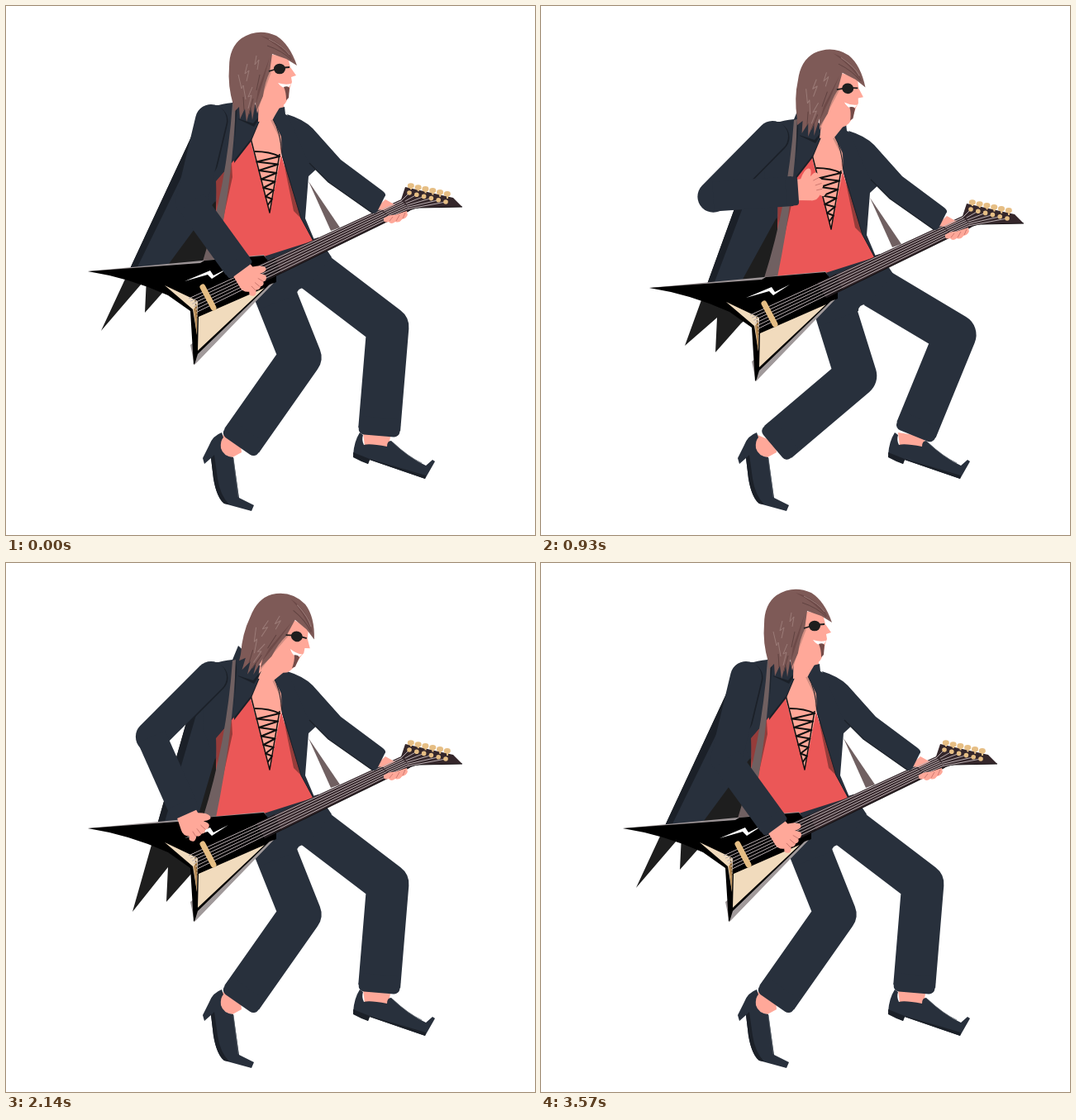
Recreate the animation shown at these times as an HTML page with a canvas. Size 640x640 px, loop 3.64 s.

```html
<!DOCTYPE html>
<html lang="en">
<head>
<meta charset="utf-8">
<title>Guitarist</title>
<style>
html, body { margin: 0; width: 100%; height: 100%; overflow: hidden; background: #fff; }
canvas { display: block; width: 640px; height: 640px; }
</style>
</head>
<body>
<canvas id="stage" width="640" height="640"></canvas>
<script>
const ctx = document.getElementById('stage').getContext('2d');
const LOOP = 3640, STEPS = 51;
const NAVY = '#28303c', DEEP = '#1b2028', LINING = '#1e1e1e', SKIN = '#ffa899',
  RED = '#eb5757', MAROON = '#953c3a', STRAP = '#706061', CREAM = '#f1dbbd',
  TAN = '#e6be84', HAIR = '#7e5a57', WOOD = '#35272b', STRING = '#b9adb0';

// step, body x, body y, head, upper arm, forearm, coat tail 1 x y, coat tail 2 x y
const KEYS = [
  [0, 0, 0, 0, 103.5, 54, 115, 393, 168, 371],
  [5, 13.5, 33, 0, 102, 66, 125.5, 360, 167.5, 371],
  [8, 19, 38, 2.5, 113, 40, 131, 367, 171, 379],
  [13, 32, 20, 7.5, 134.6, -4, 142, 391, 179, 399],
  [17, 38, 10, 11.5, 118, 40, 150, 414, 188, 411],
  [22, 18.5, 4.5, 16, 95, 92, 155.5, 427.5, 194.5, 416.5],
  [27, 1, .5, 19, 118, 80, 155, 426, 195, 414],
  [30, 0, 0, 20.5, 135, 66, 153, 422, 194, 410],
  [38, 0, 0, 11, 175.5, 65, 118, 403, 160, 389],
  [50, 0, 0, 0, 103.5, 54, 115, 393, 168, 371]
];

const rate = (i, c) => (KEYS[i + 1][c] - KEYS[i][c]) / (KEYS[i + 1][0] - KEYS[i][0]);

// Tangent that never overshoots the keys
function tangent(i, c) {
  if (i === 0 || i === KEYS.length - 1) return 0;
  const a = rate(i - 1, c), b = rate(i, c);
  return a * b <= 0 ? 0 : 2 * a * b / (a + b);
}

function poseAt(step) {
  let i = 0;
  while (i < KEYS.length - 2 && step >= KEYS[i + 1][0]) i++;
  const a = KEYS[i], b = KEYS[i + 1], h = b[0] - a[0], u = (step - a[0]) / h, v = 1 - u;
  return a.slice(1).map((_, n) => {
    const c = n + 1;
    return a[c] * (1 + 2 * u) * v * v + b[c] * u * u * (3 - 2 * u)
      + h * (tangent(i, c) * u * v * v - tangent(i + 1, c) * u * u * v);
  });
}

function fill(color, d) {
  ctx.fillStyle = color;
  ctx.fill(new Path2D(d));
}
function line(color, width, d, cap = 'butt') {
  ctx.strokeStyle = color;
  ctx.lineWidth = width;
  ctx.lineCap = cap;
  ctx.lineJoin = 'round';
  ctx.stroke(new Path2D(d));
}
function oval(color, x, y, rx, ry = rx) {
  ctx.fillStyle = color;
  ctx.beginPath();
  ctx.ellipse(x, y, rx, ry, 0, 0, 7);
  ctx.fill();
}
function cuff(x, y, w, h, r) {
  ctx.fillStyle = NAVY;
  ctx.beginPath();
  ctx.roundRect(x, y, w, h, r);
  ctx.fill();
}
function at(x, y, angle, draw) {
  ctx.save();
  ctx.translate(x, y);
  ctx.rotate(angle);
  draw();
  ctx.restore();
}
const rad = deg => deg * Math.PI / 180;

function leg(hx, hy, ax, ay, thigh, shin) {
  const dx = ax - hx, dy = ay - hy, d = Math.min(Math.hypot(dx, dy), thigh + shin);
  const bend = Math.acos((thigh * thigh + d * d - shin * shin) / (2 * thigh * d));
  const a = Math.atan2(dy, dx) - bend;
  const kx = hx + thigh * Math.cos(a), ky = hy + thigh * Math.sin(a);
  const s = Math.atan2(ay - ky, ax - kx);
  const ex = ax - 8 * Math.cos(s), ey = ay - 8 * Math.sin(s);
  line(NAVY, 51, `M${hx} ${hy}L${kx} ${ky}L${ex} ${ey}`);
  at(ax, ay, s, () => cuff(-22, -25, 22, 50, 7));
}

function feet() {
  fill(SKIN, 'M262 519L258 533Q262 545 274 546L285 540L284 528Z');
  fill(NAVY, 'M261 516Q250 520 246 531L238 547L240 554L248 547L251 572Q255 595 264 602L297 611L300 604L282 595L275 546Q263 545 260 535Q259 526 263 522Z');
  fill(DEEP, 'M248 547L251 572Q255 595 264 602L270 603Q259 592 256 572L252 543Z');
  line('#596069', .8, 'M275 547L281 594');
  fill(SKIN, 'M432 516L465 521L463 533L434 533Z');
  fill(NAVY, 'M428 516Q421 527 420 543L430 550L438 554L440 549L507 572L519 551L516 549L508 556Q488 547 466 526Q461 526 461 533Q440 529 433 531Q430 525 432 519Z');
  fill(DEEP, 'M420 540L440 548L508 568L507 572L440 549L438 554L430 551L420 546Z');
  line('#596069', .8, 'M468 528Q486 545 503 553');
}

function coat([t1x, t1y, t2x, t2y]) {
  fill(LINING, `M234 137L${t1x} ${t1y}L${t2x + 2} ${t2y - 42}L${t2x} ${t2y}L${t2x + 31} ${t2y - 35}L250 330L262 190Z`);
  const ex = 234 + (t1x - 234) * (318 - 137) / (t1y - 137);
  fill(DEEP, `M234 137L${ex} 318L${ex + 24} 318L246 150Z`);
  fill(NAVY, `M240 150L${ex + 8} 318L${193 + (t2x - 165) * 1.3} 312L253 236L272 200V120H250Z`);
}

function torso() {
  fill(NAVY, 'M240 128Q248 120 274 117L281 100L300 118L312 128L297 163L272 198L253 238L238 200Z');
  fill(NAVY, 'M312 300L378 280L394 304L364 341Q352 340 352 349L309 366L295 345Z');
  fill(SKIN, 'M308 118L305 140L296 163L303 186L319 251L333 182L334 160L323 137L336 122L336 100Z');
  fill('#d18e82', 'M325 131L319 136L331 160L332 180L336 165Z');
  fill(RED, 'M295 160L273 190L255 212L253 308L312 303L372 284L350 240L333 180L319 250Z');
  fill(MAROON, 'M273 190L254 212L257 285L264 252L274 207Z');
  fill(MAROON, 'M332 170L348 248L357 257L349 208Z');
  fill(NAVY, 'M329 124L337 122L338 131Q352 138 370 149L378 195L366 206L362 257L373 283L371 284L357 257L334 182L333 158L323 137Z');
  line(DEEP, 1, 'M323 137Q332 152 334 180L357 257L372 284');
  line('#101010', 1.5, 'M296 160L319 250L331 179');
  let lace = 'M301 176Q319 176 331 182', y = 181;
  for (let i = 1; i < 12; i++) {
    y += i % 2 ? 7.5 : 3;
    lace += `L${i % 2 ? 296 + .256 * (y - 160) : 331 - .174 * (y - 181)} ${y}`;
  }
  line('#101010', 2, lace);
  fill(STRAP, 'M274 118L278 117Q275 205 254 308L238 309Q267 217 274 118Z');
  fill(DEEP, 'M278 117L280 136L299 142L312 127L297 163L276 190Z');
  fill(NAVY, 'M280 116L281 137L300 146L309 132L297 160L275 188Z');
  fill(STRAP, 'M366 212L404 268L393 272Z');
}

function guitar() {
  fill('#9c9496', 'M99 321L312 301L315 306L190 326ZM327 331L228 434L223 410Z');
  fill('#000', 'M99 321L235 311L240 308L312 302L327 321V334L318 338L227 434L223 369L196 350Q150 329 99 321Z');
  fill('#a19a9b', 'M319 337L324 335L228 434L232 421Z');
  fill(CREAM, 'M192 338L232 357L231 398L226 367ZM233 376L313 341L232 417Z');
  fill('#b98c55', 'M231 361L227 367L231 398Z');
  fill('#fff', 'M216 333L247 320L251 326L269 317L249 330L244 325Z');
  fill(WOOD, 'M303 315L478 234L483 219L541 232L552 243L500 244Q491 245 487 248L313 333Z');
  fill('#211a1d', 'M303 315L325 304L333 323L313 333Z');
  line('#161113', 1.2, 'M313 333L487 248Q491 245 500 244L552 243');
  for (let i = 0; i < 6; i++) {
    const px = 488 + i * 8.8, py = 226 + i * 2.2;
    line(STRING, 1, `M${221 + i * 2.1} ${354 + i * 3.2}L${306 + i * 2} ${315 + i * 2.7}L${478 + i * 1.7} ${236 + i * 1.9}L${px} ${py}`);
    oval(TAN, px + 1.8, py - 8.5 - i * .25, 4, 3.3);
    line(TAN, 2, `M${px + 2} ${py - 7}v3`);
    oval(TAN, px, py, 2.8);
  }
  line(TAN, 7, 'M238 340L251 365', 'round');
  for (let i = 0; i < 6; i++) oval('#50391f', 229 + i * .5, 357 + i * 4, .8);
}

function fretArm() {
  fill(SKIN, 'M446 246L459 234Q470 240 478 245L486 252Q485 257 479 258Q476 263 471 261Q466 265 463 261Q456 263 457 257L465 253L458 247Z');
  fill(WOOD, 'M455 248L482 235L487 247L466 257Z');
  for (let i = 0; i < 6; i++) line(STRING, 1, `M${455 + i * 1.8} ${246.7 + i * 1.7}L${479 + i * 1.6} ${235.5 + i * 1.9}`);
  fill(SKIN, 'M457 257Q465 252 470 253L485 248Q487 254 480 257Q476 262 471 260Q466 264 463 260Q458 263 457 257Z');
  line('#c46f68', .8, 'M464 260L468 255M472 260L476 253M480 257L483 250');
  fill(NAVY, 'M340 131Q360 137 371 148L405 186L456 224Q461 228 458 231L449 249Q446 253 441 249L390 213L366 189Z');
  line(DEEP, 1.3, 'M367 190L390 213L444 251');
}

function head() {
  fill(SKIN, 'M318 58L341 62L344 74L351 84L345 86L346 92L344 97L341 110Q339 120 331 123L322 138L305 140L306 105Z');
  fill('#d18e82', 'M316 70L321 80L311 107L304 130L302 120Z');
  fill('#fff', 'M329 93Q338 96 345 94L341 100Q333 99 329 93Z');
  fill('#744b48', 'M336 98Q341 96 343 99L342 111L339 114Q339 104 336 98Z');
  fill(HAIR, 'M270 74Q270 50 285 39Q305 26 327 36Q343 46 352 72L339 64L322 58L319 80Q313 92 311 109L303 127L302 116L298 138L296 122L291 140L289 124L283 137L282 122L276 128L275 120Q268 96 270 74Z');
  fill('#6d4a48', 'M308 36Q336 43 348 67Q329 46 308 36ZM319 62L312 88L302 120L305 101Z');
  line('#9b7b77', 1, 'M281 83L285 100L287 96L290 113M292 70L289 82L294 78L291 91M303 60L301 71L306 65L304 77M298 98L293 110L297 108L293 124M318 40Q336 49 343 59');
  line('#604240', 1, 'M307 83L303 102M287 110L288 126M299 112L294 131M316 48Q334 54 345 65');
  line('#1e1e1e', 1.8, 'M318 79L331 75L343 74');
  oval('#1e1e1e', 331, 76, 7, 6.3);
}

function strumArm(up, fore) {
  const sx = 248, sy = 138, a = rad(up), f = rad(fore);
  const ex = sx + 102 * Math.cos(a), ey = sy + 102 * Math.sin(a);
  const wx = ex + 102 * Math.cos(f), wy = ey + 102 * Math.sin(f);
  line(DEEP, 37, `M${sx + 2} ${sy + 1}L${(sx + ex) / 2 + 2} ${(sy + ey) / 2 + 1}`, 'round');
  at(wx, wy, f, () => {
    fill(SKIN, 'M-6 -13L5 -14Q10 -25 15 -26Q20 -26 17 -16Q22 -22 25 -20Q29 -17 27 -14Q32 -12 30 -8Q33 -4 30 -1Q36 3 34 6Q31 11 27 7Q23 14 16 13L-6 11Z');
    line('#c46f68', .8, 'M27 -14L20 -11M30 -7L22 -5M30 0L23 1');
  });
  line(NAVY, 38, `M${sx} ${sy}L${ex} ${ey}`, 'round');
  line(NAVY, 36, `M${ex} ${ey}L${wx - 6 * Math.cos(f)} ${wy - 6 * Math.sin(f)}`);
  at(wx, wy, f, () => cuff(-14, -17.5, 15, 35, 4));
}

function draw(step) {
  const [x, y, tilt, up, fore, ...tails] = poseAt(step);
  ctx.clearRect(0, 0, 640, 640);
  at(x, y, 0, () => coat(tails));
  feet();
  leg(372 + x, 320 + y, 451, 520, 113, 132);
  leg(319 + x, 332 + y, 280.5, 532.5, 100, 131.5);
  at(x, y, 0, () => {
    torso();
    guitar();
    fretArm();
    at(306, 140, rad(tilt), () => {
      ctx.translate(-306, -140);
      head();
    });
    strumArm(up, fore);
  });
}

const start = performance.now();
function tick() {
  const t = (performance.now() - start) % LOOP;
  draw(Math.floor(t * STEPS / LOOP + .1) % STEPS);
  requestAnimationFrame(tick);
}
tick();
</script>
</body>
</html>
```
